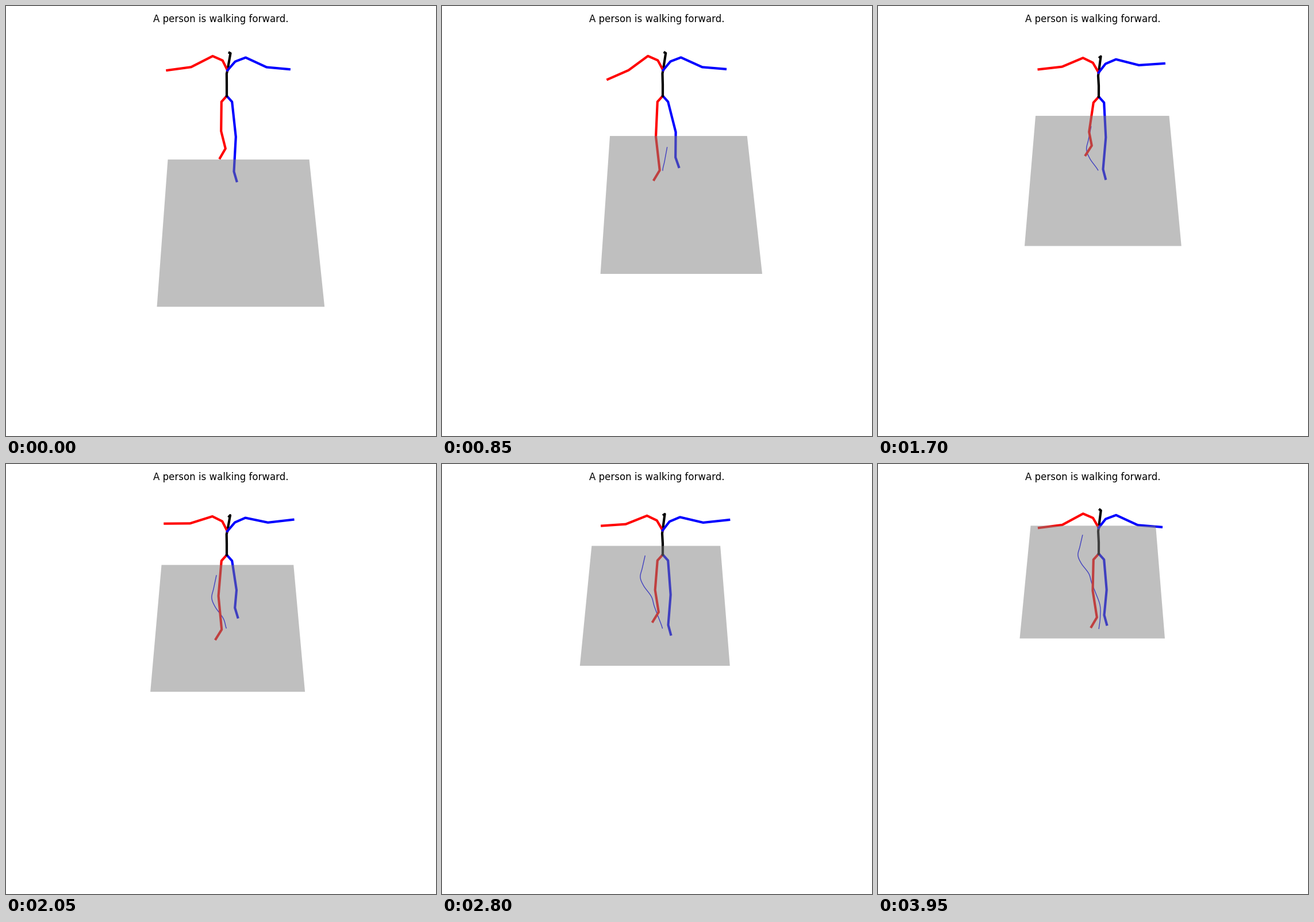
These frames come from a looping animation (748 px wide and 748 px high, 4 s). A matplotlib script:

```python
import numpy as np
import matplotlib.pyplot as plt
from matplotlib.animation import FuncAnimation

SIZE, DPI = 748, 100
FRAMES, INTERVAL = 80, 50

# Ground camera: vanishing point, width scale, plane length, walker's depth
VX, VY, WIDTH, LENGTH, HOME = 384, -1114, 5.615, 0.1133, 0.7132

# Route: time, screen height of the ground's near edge, sideways drift
ROUTE = [(0, 523.2, .0834), (9, 489.5, .102), (17, 466, .1148), (25, 445, .0888),
         (34, 417.5, .027), (40, 399.3, .0095), (47, 377.8, -.0185),
         (56, 351, -.0525), (66, 327.3, -.055), (79, 303.5, -.0446)]

# Steps: how far each foot is lifted and how far it swings sideways
STEP_T = [0, 9, 25, 34, 40, 47, 56, 66, 79]
LIFT = {-1: [1, .03, .53, 1.13, 0, .65, .76, 0, .53],
        1: [0, .95, .03, .1, .95, .3, .2, .95, .63]}
SWAY = {-1: [4, -1, 2, -6, -3, -1, -1, 1, 3],
        1: [-1, 4, 8, -6, 0, 3, -4, -3, -4]}

# Rest pose; side -1 is the walker's right
SPINE = np.array([[384, 157], [384, 137.7], [383.4, 119.1],
                  [384.5, 113.5], [389, 84.4], [387.2, 84.5]])
SPINE_BOB = np.array([.35, .45, .9, 1, 1.4, 2])
SPINE_LEAN = np.array([0, 0, .3, .5, 1, 1])
ARM = {-1: np.array([[375.2, 96.3], [358, 88.4], [321.5, 106.6], [281, 113]]),
       1: np.array([[397.2, 98.2], [415.4, 90.9], [453.8, 104.2], [496, 103.6]])}
LEG_X = {-1: (-9.2, -12.6, -6.2, -16.2), 1: (9.2, 16.5, 13.5, 18.4)}


def smooth(times, values, t):
    """Cubic Hermite curve through the given values."""
    times, values = np.asarray(times, float), np.asarray(values, float)
    slopes = np.gradient(values, times)
    i = np.clip(np.searchsorted(times, t, side="right") - 1, 0, len(times) - 2)
    h = times[i + 1] - times[i]
    u = (t - times[i]) / h
    return ((1 + 2 * u) * (1 - u) ** 2 * values[i] + u * (1 - u) ** 2 * h * slopes[i]
            + u * u * (3 - 2 * u) * values[i + 1] + u * u * (u - 1) * h * slopes[i + 1])


def wave(n, period, peak):
    return np.cos(2 * np.pi * (n - peak) / period)


def ground(side, depth):
    """Project ground coordinates to the screen."""
    scale = 1000 / depth
    return np.column_stack([VX + side * scale / WIDTH, VY + scale])


ticks = np.arange(FRAMES)
route_t, edge, drift = np.array(ROUTE).T
near = smooth(route_t, 1000 / (edge - VY), ticks)
drift = smooth(route_t, drift, ticks)
lift = {s: np.clip(smooth(STEP_T, LIFT[s], ticks), 0, 1.15) for s in LIFT}
sway = {s: smooth(STEP_T, SWAY[s], ticks) for s in SWAY}


def spine(bob, lean):
    return SPINE + np.column_stack([lean * SPINE_LEAN, bob * SPINE_BOB])


def leg(side, n, root):
    up = lift[side][n]
    bend = min(1.2 * up, 1)
    bend = bend * bend * (3 - 2 * bend)
    x = root[0] + np.array(LEG_X[side]) + sway[side][n] * np.array([0, .7, 1, 1.1])
    hip, ankle = root[1] + 10.2, 288 - 40 * up
    y = [hip, hip + 61 - 10 * bend, ankle, ankle + 16.5]
    return np.vstack([root, np.column_stack([x, y])])


def arm(side, drop, bob, lean, chest):
    dx = lean * np.array([1, 1, .5, 0]) - side * drop * np.array([0, 0, .2, .5])
    dy = bob * np.array([1, .8, 0, 0]) + drop * np.array([0, 0, .35, 1])
    return np.vstack([chest, ARM[side] + np.column_stack([dx, dy])])


def body(n):
    """Right leg, left leg, spine, right arm, left arm."""
    bob = 0.5 - 3 * wave(n, 70, 9)
    lean = 1.5 * wave(n, 22, 0)
    right_drop = 10 * wave(n, 80, 15) + 5 * wave(n, 40, 19)
    left_drop = 8 * wave(n, 80, 8)
    back = spine(bob, lean)
    root, chest = back[0], back[3]
    return [leg(-1, n, root), leg(1, n, root), back,
            arm(-1, right_drop, bob, lean, chest),
            arm(1, left_drop, bob, lean, chest)]


fig = plt.figure(figsize=(SIZE / DPI, SIZE / DPI), dpi=DPI, facecolor="white")
fig.suptitle("A person is walking forward.", y=0.9813, fontsize=12,
             family="DejaVu Sans")
ax = fig.add_axes([0, 0, 1, 1])
ax.set_xlim(0, SIZE)
ax.set_ylim(SIZE, 0)
ax.axis("off")

trail, = ax.plot([], [], color="blue", lw=1, zorder=1)
limbs = [ax.plot([], [], color=color, lw=3, zorder=2 + k / 10)[0]
         for k, color in enumerate(["red", "blue", "black", "red", "blue"])]
floor = plt.Polygon(np.zeros((4, 2)), facecolor=(0.5, 0.5, 0.5, 0.5),
                    edgecolor="none", zorder=4)
ax.add_patch(floor)


def draw(n):
    side = drift[n] + np.array([-0.5, 0.5, 0.5, -0.5])
    depth = near[n] + LENGTH * np.array([0, 0, 1, 1])
    floor.set_xy(ground(side, depth))

    past = slice(0, n if n > 1 else 0)
    trail.set_data(*ground(drift[n] - drift[past], HOME + near[n] - near[past]).T)

    for line, points in zip(limbs, body(n)):
        line.set_data(*points.T)
    return [trail, *limbs, floor]


anim = FuncAnimation(fig, draw, frames=FRAMES, interval=INTERVAL,
                     repeat=True, repeat_delay=0, blit=False)
plt.show()
```
